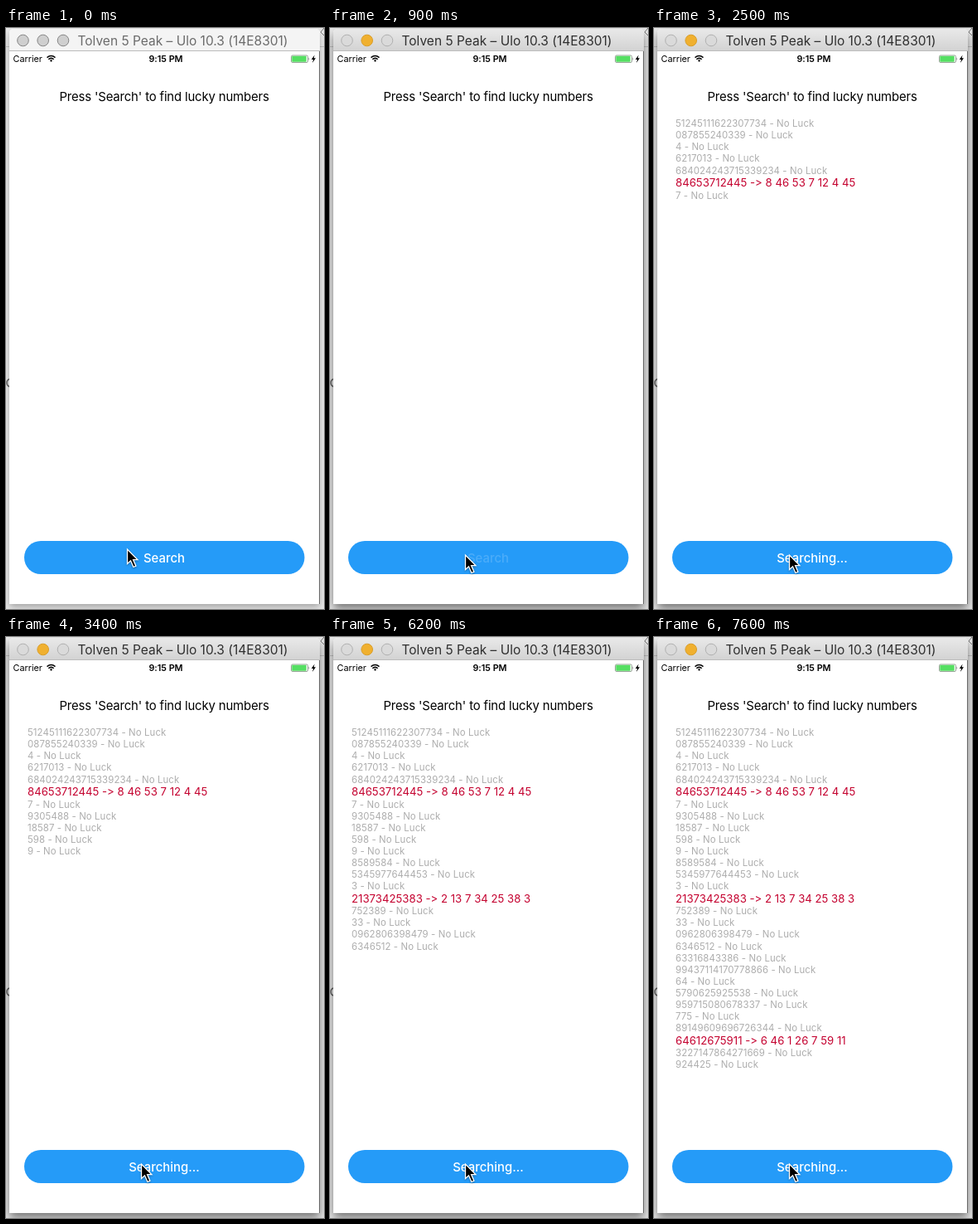
An HTML page for the animation above (8000 ms loop, 384 by 700 pixels).

```html
<!DOCTYPE html>
<html lang="en">
<head>
<meta charset="utf-8">
<title>Lucky numbers</title>
<style>
  html, body { margin: 0; width: 100%; height: 100%; overflow: hidden; background: #ebebeb; }
  #stage { position: relative; width: 384px; height: 700px; overflow: hidden; background: #ebebeb; }
  #shell {
    position: absolute; left: 4px; top: 1px; width: 375px; height: 693px;
    border-radius: 5px 5px 0 0; background: #fff;
    box-shadow: 0 4px 8px rgba(0, 0, 0, .3);
  }
  .active #shell { box-shadow: 0 6px 12px rgba(0, 0, 0, .5); }
  svg { position: absolute; left: 0; top: 0; }
  text {
    font-family: Inter, "Liberation Sans", sans-serif;
    font-feature-settings: "calt" 0;
    white-space: pre;
  }
  .mid { text-anchor: middle; }
  #bar { fill: #f4f4f4; }
  .active #bar { fill: url(#barFill); }
  #title { font-size: 15.5px; fill: #6b6b6b; }
  .active #title { fill: #2f2f2f; }
  #dots circle { fill: #cfcfcf; stroke: #858585; }
  .active #dots circle { fill: #dadada; stroke: #b0b0b0; }
  .active #dots .amber { fill: #f0b02f; stroke: #d99d28; }
  .status { font-size: 10.8px; }
  #heading { font-size: 14.9px; letter-spacing: -.15px; }
  #label { font-size: 14.9px; font-weight: 500; fill: #fff; }
  .miss { font-size: 11.4px; letter-spacing: .1px; fill: #adadad; }
  .hit { font-size: 13.2px; fill: #c4002f; }
</style>
</head>
<body>
<div id="stage">
  <svg width="384" height="700">
    <path d="M0 22.5H384" stroke="#c4c4c4"/>
    <path d="M384 0L380 5L384 9" fill="none" stroke="#777"/>
    <path d="M4 423Q1 424 1 427.5T4 432" fill="none" stroke="#666" stroke-width="1.5"/>
  </svg>
  <div id="shell"></div>
  <svg width="384" height="700">
    <defs>
      <linearGradient id="barFill" x1="0" y1="0" x2="0" y2="1">
        <stop stop-color="#e9e9e9"/>
        <stop offset="1" stop-color="#d2d2d2"/>
      </linearGradient>
    </defs>
    <path id="bar" d="M4 28V6Q4 1 9 1H374Q379 1 379 6V28Z"/>
    <path d="M4 27.5H379" stroke="#bcbcbc"/>
    <path d="M378.5 28V694" stroke="#6c6c6c"/>
    <g id="dots">
      <circle cx="20.5" cy="15" r="6.8"/>
      <circle class="amber" cx="44.7" cy="15" r="6.8"/>
      <circle cx="69" cy="15" r="6.8"/>
    </g>
    <text id="title" class="mid" x="213.5" y="20.5">Tolven 5 Peak – Ulo 10.3 (14E8301)</text>

    <text class="status" x="8.6" y="41">Carrier</text>
    <g fill="none" stroke="#000" stroke-width="1.5">
      <path d="M49.5 35.6Q54.5 31.4 59.5 35.6M51.3 37.8Q54.5 35 57.7 37.8"/>
      <path d="M53 38.9L54.5 41L56 38.9Q54.5 37.8 53 38.9Z" fill="#000" stroke="none"/>
    </g>
    <text class="status mid" x="193" y="41" font-weight="600">9:15 PM</text>
    <rect x="344.5" y="33" width="20" height="8.5" rx="1.5" fill="#fff" stroke="#7d8f7d" stroke-width=".8"/>
    <rect x="345.3" y="33.8" width="17.4" height="6.9" rx=".8" fill="#55df62"/>
    <path d="M365.6 35.5Q367 37.2 365.6 39Z" fill="#555"/>
    <path d="M372.6 32.6L368.8 38H371L370 42L374 36.3H371.7Z"/>

    <text id="heading" class="mid" x="191" y="88">Press 'Search' to find lucky numbers</text>
    <g id="list"></g>
    <rect x="22" y="618" width="338.5" height="40" rx="20" fill="#259bf8"/>
    <text id="label" class="mid" x="191" y="643.5">Search</text>
    <path id="cursor" d="M0 0V17.5L4 13.8L7.4 21.5L10.4 20.2L7.1 12.6H12.4Z"
      stroke="#fff" stroke-width="1.3" style="filter: drop-shadow(0 1px 1px rgba(0,0,0,.35))"/>
  </svg>
</div>
<script>
(() => {
  const LOOP = 8000, STEP = 100;
  const PRESS = 700, RELEASE = 1000, SEARCH = 1100;

  // Appearance time, then the rows found at that time; "a -> b" rows are lucky.
  const batches = [
    [1100, "51245111622307734"],
    [1800, "087855240339", "4"],
    [2500, "6217013", "684024243715339234", "84653712445 -> 8 46 53 7 12 4 45", "7"],
    [3200, "9305488", "18587", "598", "9"],
    [3800, "8589584"],
    [4600, "5345977644453", "3", "21373425383 -> 2 13 7 34 25 38 3", "752389", "33"],
    [5300, "0962806398479"],
    [6000, "6346512"],
    [6700, "63316843386", "99437114170778866", "64"],
    [7500, "5790625925538", "959715080678337", "775", "89149609696726344",
      "64612675911 -> 6 46 1 26 7 59 11", "3227147864271669", "924425"]
  ];

  const $ = id => document.getElementById(id);
  const clamp = v => Math.min(1, Math.max(0, v));
  const ease = p => p * p * (3 - 2 * p);

  function buildRows() {
    const rows = [];
    let edge = 108.2;
    for (const [at, ...found] of batches) {
      for (const value of found) {
        const lucky = value.includes("->");
        const height = lucky ? 16.2 : 14.05;
        const el = document.createElementNS("http://www.w3.org/2000/svg", "text");
        el.setAttribute("class", lucky ? "hit" : "miss");
        el.setAttribute("x", 26);
        el.setAttribute("y", edge + height / 2 + (lucky ? 4.8 : 4.1));
        el.textContent = lucky ? value : value + " - No Luck";
        $("list").append(el);
        rows.push({ at, el });
        edge += height;
      }
    }
    return rows;
  }

  function labelOpacity(t) {
    if (t < PRESS) return 1;
    if (t < RELEASE) return 1 - .83 * clamp((t - PRESS + 50) / 250);
    return .17 + .83 * clamp((t - RELEASE) / 300);
  }

  const rows = buildRows();

  function draw(t) {
    const move = ease(clamp((t - 50) / 550));
    $("stage").classList.toggle("active", t >= PRESS);
    $("cursor").setAttribute("transform", `translate(${146.5 + 17 * move} ${628 + 7 * move})`);
    $("label").textContent = t < SEARCH ? "Search" : "Searching...";
    $("label").style.opacity = labelOpacity(t);
    for (const { at, el } of rows) el.style.display = t >= at ? "" : "none";
  }

  const begin = performance.now();
  function tick() {
    const t = (performance.now() - begin) % LOOP;
    draw(Math.floor(t / STEP) * STEP);
    requestAnimationFrame(tick);
  }
  tick();
})();
</script>
</body>
</html>
```
